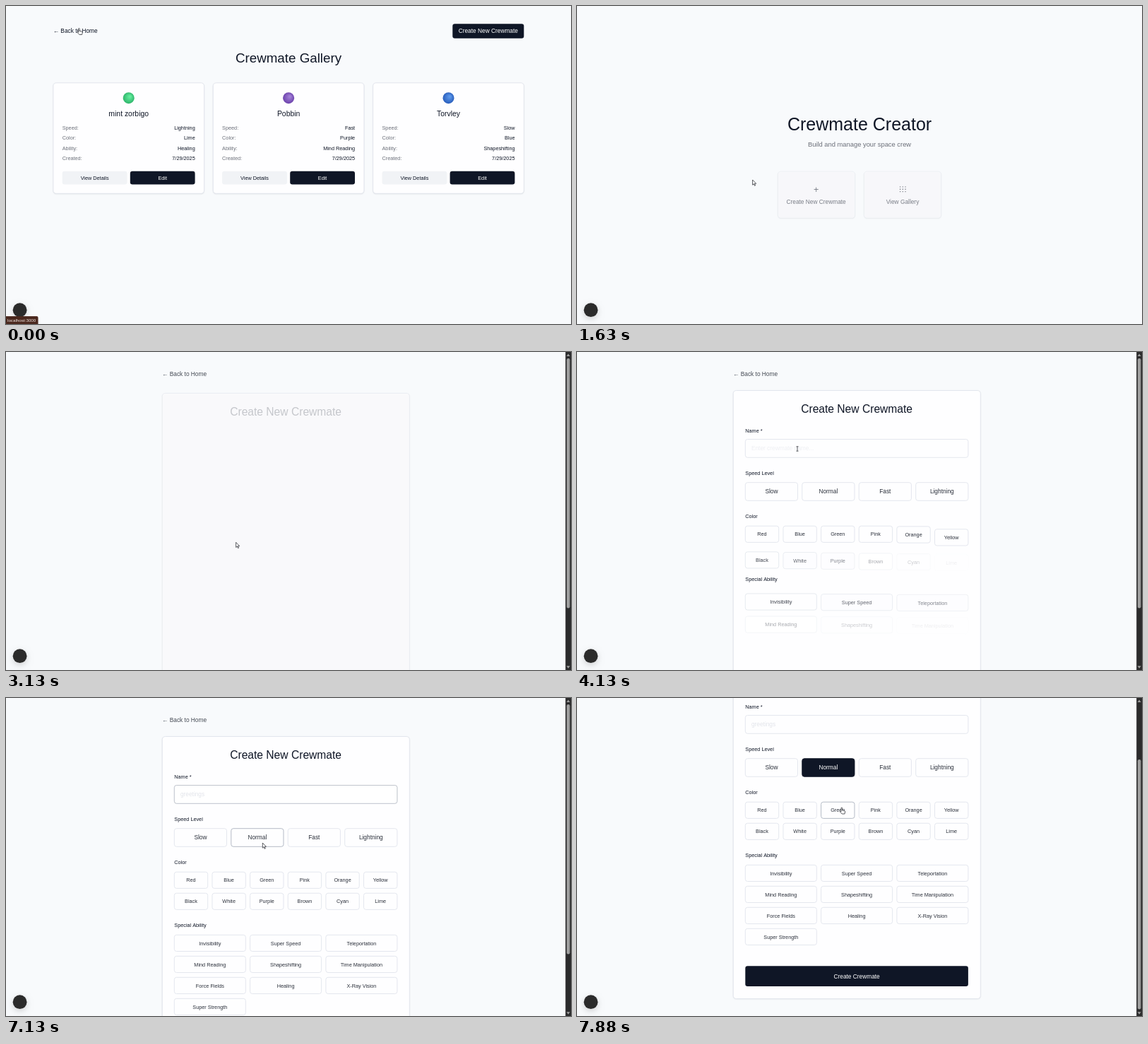
An HTML page with a canvas for the animation above (8 s loop, 800x450 px).

```html
<!DOCTYPE html>
<html lang="en">
<head>
<meta charset="utf-8">
<title>Crewmate Creator</title>
<style>
html, body { margin: 0; width: 100%; height: 100%; overflow: hidden; background: #f8fafc; }
canvas { display: block; width: 800px; height: 450px; }
</style>
</head>
<body>
<canvas id="stage"></canvas>
<script>
const LOOP = 8000;
const canvas = document.getElementById('stage');
const dpr = window.devicePixelRatio || 1;
canvas.width = 800 * dpr;
canvas.height = 450 * dpr;
const ctx = canvas.getContext('2d');

const PAGE = '#f8fafc', INK = '#0f1626', GREY = '#6b6f79', LINE = '#e1e5ec', HOVER = '#adb4c0';
// Type sizes: the page is laid out 1536 units wide on an 800 px stage
const SM = 7.29, MD = 8.333, LG = 9.375, XL = 10.42, H3 = 15.625, H2 = 18.75, H1 = 25;
const SHIFT = 10.4;

const clamp = v => Math.max(0, Math.min(1, v));
const lerp = (a, b, p) => a + (b - a) * p;
const smooth = p => p * p * (3 - 2 * p);
const easeOut = p => 1 - (1 - p) ** 2;
const span = (t, start, length) => clamp((t - start) / length);

function group(alpha, dx, dy, draw) {
  if (alpha <= 0) return;
  ctx.save();
  ctx.globalAlpha *= alpha;
  ctx.translate(dx, dy);
  draw();
  ctx.restore();
}

// y is the middle of the capitals
function text(str, x, y, size, color = INK, align = 'center') {
  ctx.font = `${size}px "Liberation Sans", Arial, sans-serif`;
  ctx.textAlign = align;
  ctx.fillStyle = color;
  ctx.fillText(str, x, y + size * 0.358);
}

function box(x, y, w, h, fill, stroke, radius = 3.2) {
  ctx.beginPath();
  ctx.roundRect(x, y, w, h, radius);
  ctx.fillStyle = fill;
  ctx.fill();
  if (!stroke) return;
  ctx.strokeStyle = stroke;
  ctx.lineWidth = 0.9;
  ctx.stroke();
}

function card(x, y, w, h) {
  ctx.save();
  ctx.shadowColor = 'rgba(15,23,42,.16)';
  ctx.shadowBlur = 2 * dpr;
  ctx.shadowOffsetY = 0.6 * dpr;
  box(x, y, w, h, '#fefeff', null, 4.2);
  ctx.restore();
  box(x, y, w, h, '#fefeff', LINE, 4.2);
}

function button(label, x, y, w, h, size, dark, fill = '#f1f3f6') {
  box(x, y, w, h, dark ? INK : fill);
  text(label, x + w / 2, y + h / 2, size, dark ? '#fff' : INK);
}

// ---------- gallery ----------
const crew = [
  ['mint zorbigo', 'Lightning', 'Lime', 'Healing', '#63ec9c', '#2fb66c'],
  ['Pobbin', 'Fast', 'Purple', 'Mind Reading', '#a17fd6', '#6d43ad'],
  ['Torvley', 'Slow', 'Blue', 'Shapeshifting', '#5b97ea', '#2a5fbd']
];

function gallery() {
  text('← Back to Home', 66.7, 35.5, MD, INK, 'left');
  button('Create New Crewmate', 632.3, 25.2, 101, 20.6, MD, true);
  text('Crewmate Gallery', 400, 73, H2);
  crew.forEach(([name, speed, color, ability, light, deep], i) => {
    const x = 66.9 + i * 226.4, mid = x + 106.8;
    card(x, 108.8, 213.6, 156.5);
    const ball = ctx.createRadialGradient(mid + 2, 128, 1, mid, 130, 8);
    ball.addColorStop(0, light);
    ball.addColorStop(1, deep);
    ctx.fillStyle = ball;
    ctx.beginPath();
    ctx.arc(mid, 130.2, 8, 0, 7);
    ctx.fill();
    text(name, mid, 152, XL);
    const rows = { Speed: speed, Color: color, Ability: ability, Created: '7/29/2025' };
    Object.entries(rows).forEach(([key, value], r) => {
      const y = 172.2 + r * 14.55;
      text(key + ':', x + 12.8, y, SM, GREY, 'left');
      text(value, x + 200.8, y, SM, INK, 'right');
    });
    button('View Details', x + 12.8, 233.8, 91.8, 18.7, SM, false);
    button('Edit', x + 108.9, 233.8, 91.8, 18.7, SM, true);
  });
}

// ---------- home ----------
function home(t) {
  const title = easeOut(span(t, 800, 500));
  group(title, 0, -SHIFT * (1 - title), () => text('Crewmate Creator', 400, 167.2, H1));
  group(span(t, 1050, 500), 0, 0, () => text('Build and manage your space crew', 400, 195.7, LG, GREY));
  const p = smooth(span(t, 1370, 500));
  group(p, 0, SHIFT * (1 - p), () => {
    card(284.4, 229.3, 109.2, 66);
    card(406.4, 229.3, 109.2, 66);
    text('+', 338.6, 254.2, 12.5);
    for (let i = 0; i < 9; i++) {
      box(456.9 + (i % 3) * 3.7, 250.3 + Math.floor(i / 3) * 3.4, 1.4, 1.4, INK, null, 0.5);
    }
    text('Create New Crewmate', 338.6, 272.5, MD);
    text('View Gallery', 461, 272.5, MD);
  });
}

// ---------- form ----------
const LEFT = 238.3, WIDTH = 315.6, GAP = 6.25;
const sections = [
  { label: 'Speed Level', y: 171, top: 184.7, h: 25.6, cols: 4, size: MD, start: 3300,
    items: 'Slow,Normal,Fast,Lightning' },
  { label: 'Color', y: 232, top: 246.2, h: 23.2, cols: 6, size: SM, start: 3560,
    items: 'Red,Blue,Green,Pink,Orange,Yellow,Black,White,Purple,Brown,Cyan,Lime' },
  { label: 'Special Ability', y: 321.4, top: 335.3, h: 23.2, cols: 3, size: SM, start: 3860,
    items: 'Invisibility,Super Speed,Teleportation,Mind Reading,Shapeshifting,Time Manipulation,' +
      'Force Fields,Healing,X-Ray Vision,Super Strength' }
];
const keyTimes = [5100, 5240, 5420, 5620, 5950, 6050, 6150, 6250, 6340];

// Fades in over six stagger steps while drifting, then snaps up into place
function rise(steps) {
  return steps < 6 ? SHIFT - 0.7 * Math.max(0, steps) : 6.2 * clamp(1 - (steps - 6) / 1.6);
}

function nameField(t) {
  text('Name *', LEFT, 111.8, SM, INK, 'left');
  const focus = span(t, 4600, 150) * (1 - smooth(span(t, 7040, 180)));
  box(LEFT, 123.5, WIDTH, 25.8, '#fefeff', LINE);
  group(focus, 0, 0, () => box(LEFT, 123.5, WIDTH, 25.8, '#fefeff', '#8b919e'));
  const typed = 'greetings'.slice(0, keyTimes.filter(k => k <= t).length);
  text(typed || 'Enter crewmate name...', 246.9, 136.5, MD, typed ? '#e2e4ea' : '#eeeff3', 'left');
}

function options(section, t) {
  const { cols, size, h } = section;
  const w = (WIDTH - GAP * (cols - 1)) / cols;
  section.items.split(',').forEach((label, i) => {
    const steps = (t - section.start) / 50 - i;
    const x = LEFT + (i % cols) * (w + GAP);
    const y = section.top + Math.floor(i / cols) * 30;
    const hovered = (label === 'Normal' && t > 6950) || (label === 'Green' && t > 7650);
    const chosen = label === 'Normal' && t > 7230;
    group(clamp(steps / 6), 0, rise(steps), () => {
      box(x, y, w, h, chosen ? INK : '#fefeff', chosen ? INK : hovered ? HOVER : LINE);
      text(label, x + w / 2, y + h / 2, size, chosen ? '#fff' : '#2b303b');
    });
  });
}

function form(t) {
  const scroll = 99 * smooth(span(t, 7270, 450));
  group(1, 0, -scroll, () => {
    const link = easeOut(span(t, 2620, 450));
    group(link, -SHIFT * (1 - link), 0, () => text('← Back to Home', 221.1, 31.2, MD, '#454a54', 'left'));
    const p = easeOut(span(t, 2900, 600));
    group(p, 0, SHIFT * (1 - p), () => {
      card(221.3, 54.5, 350, 470);
      group(smooth(span(t, 2970, 400)), 0, 0, () => text('Create New Crewmate', 396.1, 80.8, H3));
      const slide = (start, draw) => {
        const s = easeOut(span(t, start, 400));
        group(s, -SHIFT * (1 - s), 0, draw);
      };
      slide(3180, () => nameField(t));
      sections.forEach((section, i) => slide(3280 + i * 100, () => {
        text(section.label, LEFT, section.y, SM, INK, 'left');
        options(section, t);
      }));
      slide(4200, () => button('Create Crewmate', LEFT, 478.2, WIDTH, 28.8, MD, true));
    });
  });
  scrollbar(9 + scroll * 78 / 99);
}

function scrollbar(y) {
  ctx.fillStyle = '#2b2b2c';
  ctx.fillRect(792.2, 0, 7.8, 450);
  box(793.9, y, 4.5, 353.5, '#9f9f9f', null, 2.2);
  ctx.fill(new Path2D('M793.6 6L796.1 2.5 798.6 6ZM793.6 444.3L796.1 447.8 798.6 444.3Z'));
}

// ---------- overlays ----------
function status(label) {
  const w = label.length * 2.88 + 5.2;
  box(0, 439, w, 11, '#4b281e', null, [0, 2, 0, 0]);
  text(label, 2, 444.6, 6.25, '#f3e9e5', 'left');
}

function badge() {
  ctx.save();
  ctx.shadowColor = 'rgba(0,0,0,.16)';
  ctx.shadowBlur = 9 * dpr;
  ctx.shadowOffsetY = 3 * dpr;
  ctx.fillStyle = '#2b2b2b';
  ctx.beginPath();
  ctx.arc(19.6, 430.2, 9.9, 0, 7);
  ctx.fill();
  ctx.restore();
}

const arrow = new Path2D('M0 0V7.2L1.7 5.7 2.9 8.4 4 7.9 2.8 5.3H5.1Z');
const hand = new Path2D('M0 .8A.8 .8 0 0 1 1.6 .8V4L4.9 4.6Q5.8 4.9 5.6 6L5 9H1.2L-1.6 5.9Q-1.6 4.9 -.6 5.2L0 5.8Z');
const beam = new Path2D('M-1.5 -3.2H1.5M0 -3.2V3.2M-1.5 3.2H1.5');
// time, x, y
const route = [
  [0, 102.6, 31.5], [650, 102.6, 31.5], [1450, 248.6, 246], [1750, 248.6, 246], [2150, 326, 269],
  [3250, 325.6, 269.3], [3800, 312, 137], [4400, 312, 137], [4800, 314.6, 145.5], [6500, 314.6, 145.5],
  [7050, 363.3, 205], [7350, 363.3, 205], [7700, 374, 155], [LOOP, 374, 155]
];

function pointer(t) {
  if (t > 5080 && t < 6600) return;
  const i = route.findIndex(stop => stop[0] > t);
  const [t0, x0, y0] = route[i - 1], [t1, x1, y1] = route[i];
  const p = smooth((t - t0) / (t1 - t0));
  const overField = t > 3740 && t < 6750;
  const overLink = t < 720 || (t > 1950 && t < 2500) || t > 7200;
  group(1, lerp(x0, x1, p), lerp(y0, y1, p), () => {
    const shape = overField ? beam : overLink ? hand : arrow;
    ctx.fillStyle = '#fff';
    ctx.strokeStyle = '#33353b';
    ctx.lineWidth = 0.8;
    if (!overField) ctx.fill(shape);
    ctx.stroke(shape);
  });
}

function draw() {
  const t = performance.now() % LOOP;
  ctx.setTransform(dpr, 0, 0, dpr, 0, 0);
  ctx.fillStyle = PAGE;
  ctx.fillRect(0, 0, 800, 450);
  if (t < 750) gallery();
  else if (t < 2500) home(t);
  else form(t);
  badge();
  if (t < 1000) status('localhost:3000');
  else if (t > 2000 && t < 2800) status('localhost:3000/create');
  pointer(t);
  requestAnimationFrame(draw);
}
draw();
</script>
</body>
</html>
```
